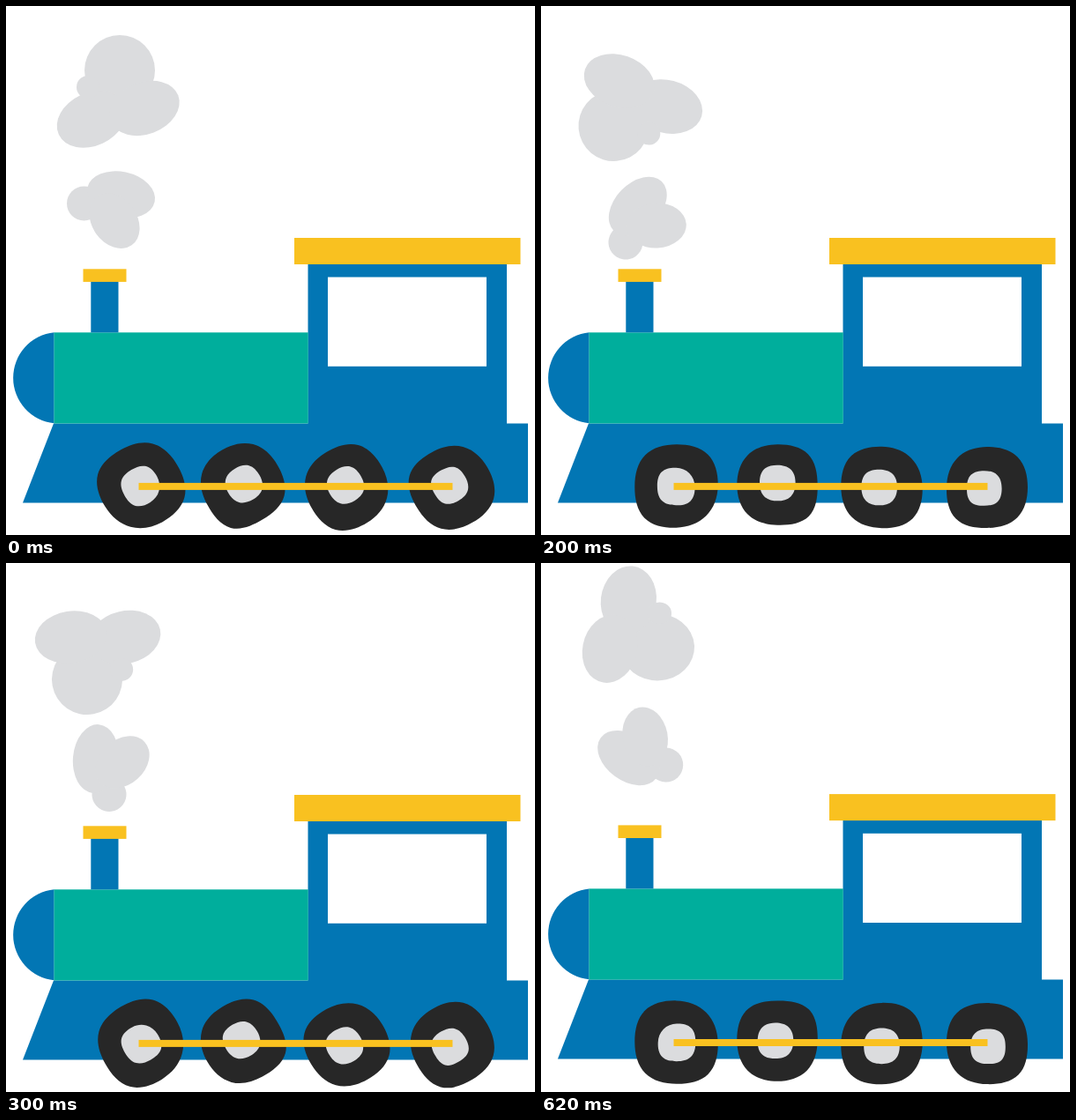
Recreate the animation shown at these times as an HTML page. Size 600 by 600 pixels, loop 700 ms.

```html
<!DOCTYPE html>
<html lang="en">
<head>
<meta charset="utf-8">
<title>Steam train</title>
<style>
  html, body { margin: 0; width: 100%; height: 100%; overflow: hidden; background: #fff; }
  svg { display: block; width: 100vw; height: 100vh; }
  .blue { fill: #0276b4; }
  .teal { fill: #00ae9c; }
  .gold { fill: #f9c120; }
  .tyre { fill: #272727; }
  .grey { fill: #dbdcde; }
</style>
</head>
<body>
<svg viewBox="0 0 600 600">
  <g id="bigPuff" class="grey">
    <circle r="40"/>
    <ellipse rx="41" ry="30" transform="translate(-32 55.5) rotate(-25)"/>
    <ellipse rx="41" ry="29.5" transform="translate(28 43) rotate(-21)"/>
    <circle cx="-36" cy="19" r="13"/>
  </g>
  <g id="smallPuff" class="grey">
    <circle r="19.5"/>
    <ellipse rx="39" ry="26" transform="translate(42 -10) rotate(12)"/>
    <ellipse rx="34" ry="25.5" transform="translate(34.5 19.5) rotate(55)"/>
  </g>
  <g id="train">
    <path class="blue" d="M54.6 370.3A51.72 51.72 0 0 0 54.6 473.2Z"/>
    <path class="blue" fill-rule="evenodd"
      d="M54 473.4H342.5V292H568V473.4H592V563.4H19ZM365 307.6V408.8H545V307.6Z"/>
    <rect class="teal" x="54.5" y="370.3" width="288.2" height="103.2"/>
    <rect id="chimney" class="blue" x="96.3" y="312" width="31.2"/>
    <rect class="gold" x="87.5" y="298.3" width="49" height="14.6"/>
    <rect class="gold" x="327" y="263" width="256.5" height="30"/>
    <g id="wheels"></g>
    <rect class="gold" x="150.5" y="540.9" width="356" height="8"/>
  </g>
</svg>
<script>
const STEP = 100, LOOP = 700;
const $ = id => document.getElementById(id);

// One entry per step; puffs are [x, y, turn, scaleX, scaleY]
const poses = [
  { dy: 0,    stack: 370.3, big: [129, 73, 0],                      small: [88.5, 224, 0] },
  { dy: -0.3, stack: 375.6, big: [108, 48.5, -29],                  small: [88.5, 219.5, -22] },
  { dy: 0,    stack: 370.3, big: [82.5, 136, -140],                 small: [96, 268, -58] },
  { dy: 0,    stack: 370.3, big: [92, 132, -168],                   small: [117, 262.5, -97] },
  { dy: 0.8,  stack: 370.3, big: [116.8, 120.7, -206, 1, 0.97],     small: [130.5, 251.5, -121.5, 1.04] },
  { dy: -0.9, stack: 370.3, big: [132, 95.5, -239, 1.05, 0.95],     small: [141.7, 229, -156] }
];

// Corners are radii at lower right, lower left, upper left, upper right
const wheels = [
  { x: 153.5, y: 544.5, side: 47.2, corners: [47.8, 51.1, 49.8, 50.6],
    hub: { x: -0.3, y: 0.5, side: 21.3, corners: [23.2, 22.8, 23.2, 21.3] } },
  { x: 268,   y: 543,   side: 45.7, corners: [50.6, 47.5, 47.5, 49.2],
    hub: { x: 0.3,  y: -2,  side: 20.3, corners: [21.4, 21.4, 21.8, 21.4] } },
  { x: 386.5, y: 546,   side: 46.2, corners: [49.7, 47.9, 49.7, 47.1],
    hub: { x: -2.8, y: 0,   side: 20.3, corners: [21.4, 21.4, 21.8, 21.4] } },
  { x: 506,   y: 546,   side: 46,   corners: [48.4, 50.1, 47.5, 48.8],
    hub: { x: -3.2, y: 1,   side: 19.8, corners: [21.4, 21.8, 21.4, 21] } }
];

// Smooth closed curve through four sides and four corners
function blob({ side, corners }, cx = 0, cy = 0) {
  const pts = Array.from({ length: 8 }, (_, i) => {
    const r = i % 2 ? corners[(i - 1) / 2] : side;
    const a = i * Math.PI / 4;
    return [cx + r * Math.cos(a), cy + r * Math.sin(a)];
  });
  const at = i => pts[(i + 8) % 8];
  const lean = (p, a, b) => p.map((v, k) => (v + (b[k] - a[k]) / 5.33).toFixed(2));
  let d = "M" + pts[0];
  for (let i = 0; i < 8; i++) {
    const p = at(i), q = at(i + 1);
    d += "C" + [lean(p, at(i - 1), q), lean(q, at(i + 2), p), q].join(" ");
  }
  return d + "Z";
}

function add(parent, tag, attrs) {
  const el = document.createElementNS("http://www.w3.org/2000/svg", tag);
  for (const k in attrs) el.setAttribute(k, attrs[k]);
  return parent.appendChild(el);
}

for (const w of wheels) {
  w.el = add($("wheels"), "g", {});
  add(w.el, "path", { class: "tyre", d: blob(w) });
  add(w.el, "path", { class: "grey", d: blob(w.hub, w.hub.x, w.hub.y) });
}

function place(el, [x, y, turn, sx = 1, sy = 1]) {
  el.setAttribute("transform", `translate(${x} ${y}) scale(${sx} ${sy}) rotate(${turn})`);
}

function show(i) {
  const { dy, stack, big, small } = poses[i];
  place($("bigPuff"), big);
  place($("smallPuff"), small);
  place($("train"), [0, dy, 0]);
  $("chimney").setAttribute("height", stack - 312);
  for (const w of wheels) place(w.el, [w.x, w.y, 60 - 30 * i]);
}

const start = performance.now();
let shown = -1;

function tick() {
  const t = (performance.now() - start) % LOOP;
  const i = Math.min(poses.length - 1, Math.floor(t / STEP));
  if (i !== shown) show(shown = i);
  requestAnimationFrame(tick);
}
tick();
</script>
</body>
</html>
```
